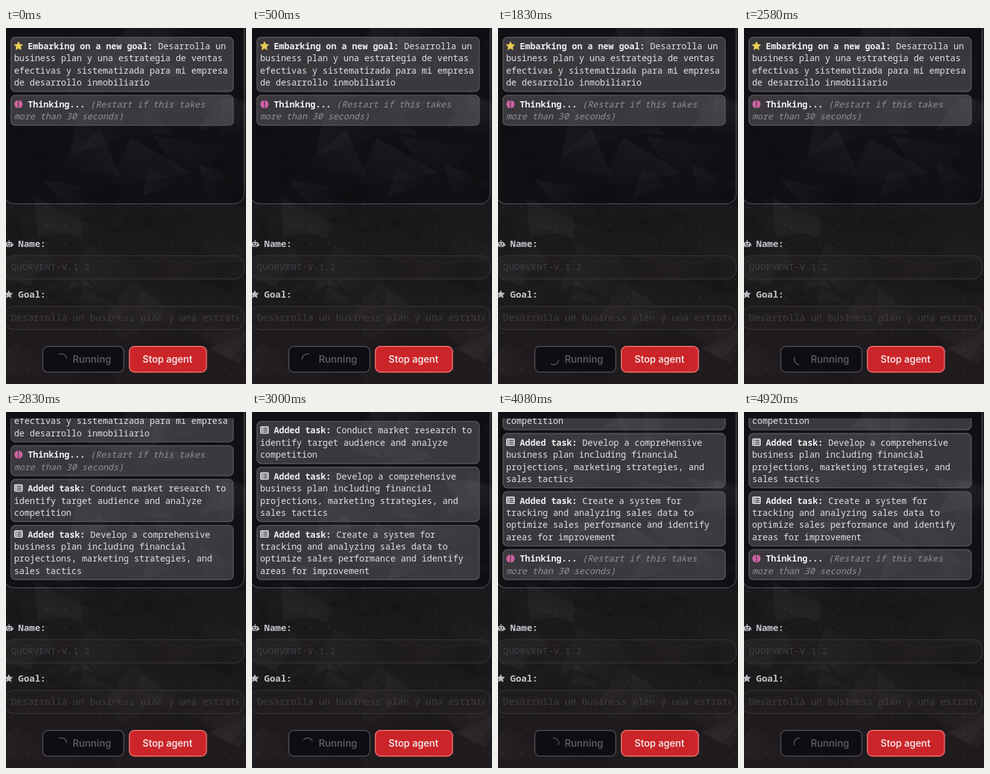
Recreate the animation shown at these times as an HTML page with a canvas. Size 385 by 569 pixels, loop 5.01 s.

```html
<!DOCTYPE html>
<html lang="en">
<head>
<meta charset="utf-8">
<title>Agent console</title>
<style>
  html, body { margin: 0; width: 100%; height: 100%; overflow: hidden; background: #1b191c; }
  canvas { display: block; width: 385px; height: 569px; }
</style>
</head>
<body>
<canvas id="stage"></canvas>
<script>
const W = 385, H = 569, LOOP = 5010, FRAME = 1000 / 12;
const MONO = '"Noto Sans Mono", "DejaVu Sans Mono", monospace';
const SANS = 'Inter, "Liberation Sans", sans-serif';
const LINE = 19.4, GAP = 4.6, VIEW = 254.7;
const FIRST_TASK = 32, STEPS_PER_MESSAGE = 2;
const SPIN_START = -65, SPIN_PER_STEP = 169.5;

const canvas = document.getElementById('stage');
const ratio = window.devicePixelRatio || 1;
canvas.width = W * ratio;
canvas.height = H * ratio;
const ctx = canvas.getContext('2d');
ctx.scale(ratio, ratio);

const thinking = {
  icon: brain, title: 'Thinking...', soft: true,
  lines: ['(Restart if this takes', 'more than 30 seconds)']
};
const task = (...lines) => ({ icon: list, title: 'Added task:', lines });

const messages = [
  { icon: (x, y) => star(x, y, 7, '#e8cc55'), title: 'Embarking on a new goal:',
    lines: ['Desarrolla un', 'business plan y una estrategia de ventas',
            'efectivas y sistematizada para mi empresa', 'de desarrollo inmobiliario'] },
  thinking,
  task('Conduct market research to', 'identify target audience and analyze', 'competition'),
  task('Develop a comprehensive', 'business plan including financial',
       'projections, marketing strategies, and', 'sales tactics'),
  task('Create a system for', 'tracking and analyzing sales data to',
       'optimize sales performance and identify', 'areas for improvement'),
  thinking
];

function seeded(seed) {
  return () => (seed = (seed * 16807) % 2147483647) / 2147483647;
}

function roundBox(x, y, w, h, r, fill, stroke, lw = 2) {
  ctx.beginPath();
  ctx.roundRect(x, y, w, h, r);
  ctx.fillStyle = fill;
  ctx.fill();
  if (stroke) {
    ctx.strokeStyle = stroke;
    ctx.lineWidth = lw;
    ctx.stroke();
  }
}

function text(str, x, y, font, color) {
  ctx.font = font;
  ctx.fillStyle = color;
  ctx.fillText(str, x, y);
}

function clipped(x, y, w, h, draw) {
  ctx.save();
  ctx.beginPath();
  ctx.rect(x, y, w, h);
  ctx.clip();
  draw();
  ctx.restore();
}

function star(x, y, r, color) {
  ctx.beginPath();
  for (let i = 0; i < 10; i++) {
    const a = i * Math.PI / 5 - Math.PI / 2, d = i % 2 ? r * .48 : r;
    ctx.lineTo(x + d * Math.cos(a), y + d * Math.sin(a));
  }
  ctx.closePath();
  ctx.fillStyle = ctx.strokeStyle = color;
  ctx.lineWidth = 1;
  ctx.lineJoin = 'round';
  ctx.fill();
  ctx.stroke();
}

function brain(x, y) {
  ctx.fillStyle = '#cf63a2';
  for (const side of [-1, 1]) {
    ctx.beginPath();
    ctx.ellipse(x + side * .6, y, 6, 6.3, 0, -Math.PI / 2, Math.PI / 2, side < 0);
    ctx.fill();
  }
}

function list(x, y) {
  roundBox(x - 7, y - 6.5, 14, 12, 2, '#d0cfd4');
  ctx.fillStyle = '#3b393f';
  for (let row = y - 4; row < y + 4; row += 3) {
    ctx.fillRect(x - 4.8, row, 1.6, 1.4);
    ctx.fillRect(x - 1.8, row, 6.6, 1.4);
  }
}

function robot(x, y) {
  roundBox(x - 4.8, y - 3, 9.6, 8, 2, '#b9b8bc');
  ctx.fillRect(x - .7, y - 6, 1.4, 3);
  ctx.fillRect(x - 6.6, y - .5, 13.2, 4);
  ctx.fillStyle = '#1b191c';
  ctx.fillRect(x - 3, y - 1, 2, 2);
  ctx.fillRect(x + 1, y - 1, 2, 2);
  ctx.fillRect(x - 2.6, y + 2.7, 5.2, 1);
}

function background() {
  const g = ctx.createLinearGradient(0, 280, 0, H);
  g.addColorStop(0, '#1b191c');
  g.addColorStop(1, '#1f1b1e');
  ctx.fillStyle = g;
  ctx.fillRect(0, 0, W, H);
  ctx.fillStyle = 'rgba(255,255,255,.07)';
  for (let y = 287; y < H; y += 28.7) {
    for (let x = 8; x < W; x += 28.7) {
      ctx.beginPath();
      ctx.arc(x, y, 1.5, 0, 7);
      ctx.fill();
    }
  }
  roundBox(-3, -30, 385, 311, 16, '#111014', '#3b393e');
}

// Crumpled paper: faint random triangles, each fading towards one corner.
function paper() {
  const random = seeded(71);
  for (let i = 0; i < 70; i++) {
    const x = random() * W, y = random() * H, turn = random() * 7;
    const corner = k => {
      const a = turn + k * 2.1, d = 25 + random() * 45;
      return [x + d * 1.3 * Math.cos(a), y + d * .8 * Math.sin(a)];
    };
    const points = [0, 1, 2].map(corner);
    const g = ctx.createLinearGradient(...points[0], ...points[1]);
    const tone = i % 2 ? '255,250,255' : '0,0,0', alpha = i % 2 ? .035 : .14;
    g.addColorStop(0, `rgba(${tone},0)`);
    g.addColorStop(1, `rgba(${tone},${alpha})`);
    ctx.beginPath();
    points.forEach(p => ctx.lineTo(...p));
    ctx.fillStyle = g;
    ctx.fill();
  }
}

const boxHeight = m => m.lines.length * LINE + 10.6;

function drawMessages(shown) {
  const total = shown.reduce((sum, m) => sum + boxHeight(m) + GAP, -GAP);
  let y = 14 - Math.max(0, total - VIEW);
  for (const m of shown) {
    drawMessage(m, y);
    y += boxHeight(m) + GAP;
  }
}

function drawMessage(m, y) {
  roundBox(8, y + .8, 356.5, boxHeight(m) - 1.6, 7, 'rgba(255,250,255,.175)', '#515055', 1.8);
  m.icon(20, y + 15);
  text(m.title, 35, y + 20, `bold 13.95px ${MONO}`, '#efeef1');
  const start = 35 + ctx.measureText(m.title + ' ').width;
  const font = `${m.soft ? 'italic ' : ''}13.95px ${MONO}`;
  m.lines.forEach((line, i) =>
    text(line, i ? 13 : start, y + 20 + i * LINE, font, m.soft ? '#929096' : '#e3e2e6'));
}

function field(label, value, y) {
  text(label, 19.5, y, `bold 14.85px ${MONO}`, '#c6c5c9');
  roundBox(-3, y + 14, 385, 37, 15, 'rgba(40,37,41,.3)', '#2d2b2f');
  clipped(0, y + 14, 373, 37, () => text(value, 8, y + 37, `15.05px ${MONO}`, '#403e43'));
}

function spinner(x, y, step) {
  const mid = (SPIN_START + SPIN_PER_STEP * step) * Math.PI / 180;
  ctx.beginPath();
  ctx.arc(x, y, 8.6, mid - 1, mid + 1);
  ctx.strokeStyle = '#605e63';
  ctx.lineWidth = 1.4;
  ctx.stroke();
}

function buttons(step) {
  roundBox(59, 509, 130, 41, 8, '#0e0d11', '#434146');
  spinner(89, 529.5, step);
  text('Running', 107, 535, `600 15.5px ${SANS}`, '#59575c');
  roundBox(198, 509, 123.5, 41, 8, '#cb2529', '#e06464');
  text('Stop agent', 219, 535, `600 15.3px ${SANS}`, '#f0dfdf');
}

function render(now) {
  const step = Math.floor((now % LOOP + 5) / FRAME) % 60;
  const added = Math.floor((step - FIRST_TASK) / STEPS_PER_MESSAGE) + 1;
  const shown = messages.slice(0, 2 + Math.max(0, added));
  background();
  paper();
  clipped(0, 10, 380, 269, () => drawMessages(shown));
  robot(5, 345);
  field('Name:', 'QUORVENT-V.1.2', 350);
  star(4.5, 426, 6.2, '#b9b8bc');
  field('Goal:', 'Desarrolla un business plan y una estrategia', 431);
  buttons(step);
}

const began = performance.now();
function tick() {
  render(performance.now() - began);
  requestAnimationFrame(tick);
}
tick();
</script>
</body>
</html>
```
